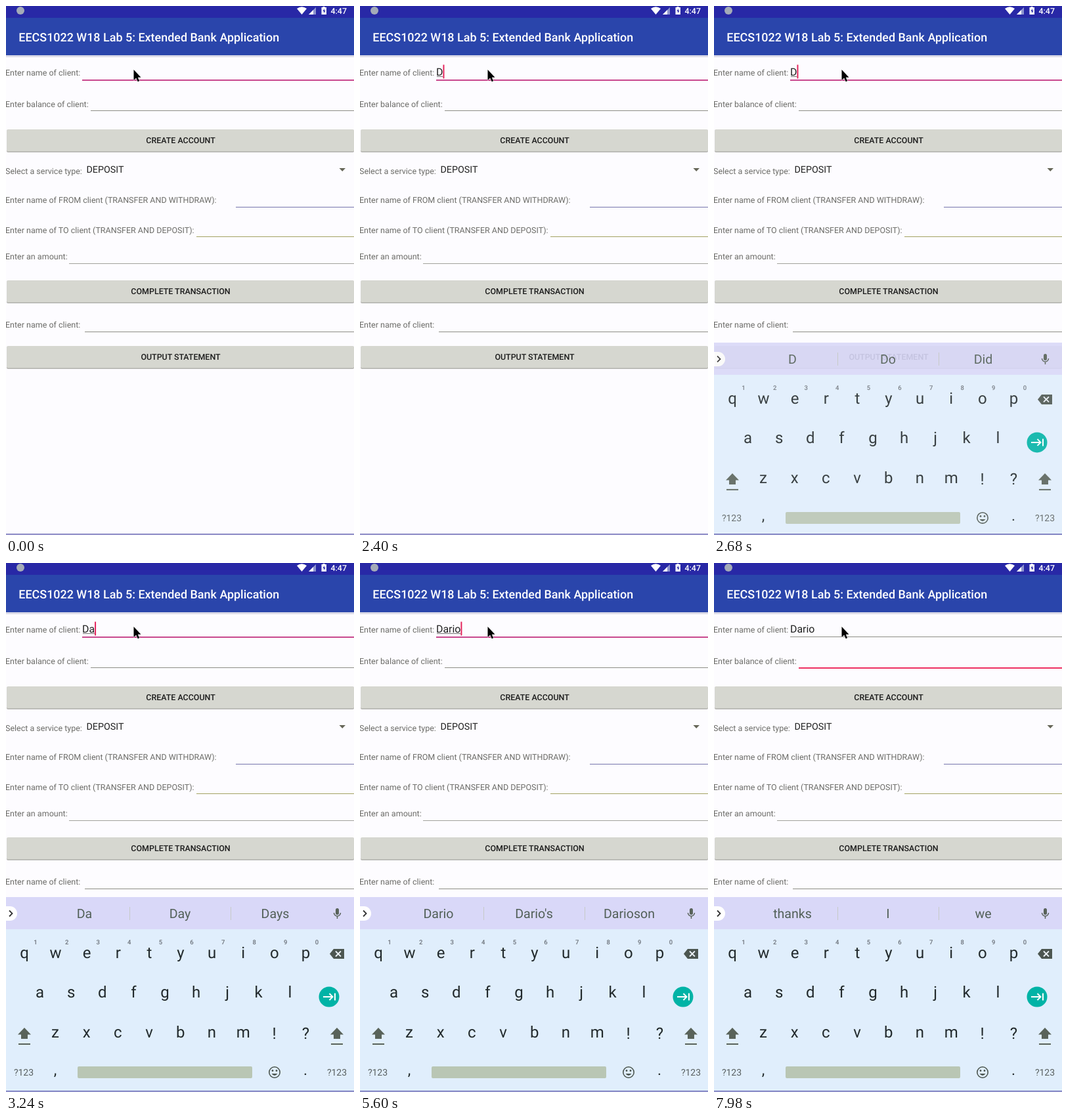
Write an HTML page that moves like this. It is 530 by 806 pixels and loops after 8000 ms.

```html
<!DOCTYPE html>
<html lang="en">
<head>
<meta charset="utf-8">
<title>Bank form</title>
<style>
  html, body { margin: 0; width: 100%; height: 100%; overflow: hidden; background: #fdfcff; }
  svg { display: block; width: 100%; height: 100%; font-family: Roboto, sans-serif; text-rendering: geometricPrecision; }
</style>
</head>
<body>
<svg id="stage" viewBox="0 0 530 806"></svg>
<script>
const LOOP = 8000;
const KEYBOARD_START = 2480, KEYBOARD_TIME = 480, KEYBOARD_DROP = 59;
const FOCUS_TIME = 6040;

// Each entry: start time, typed text, three suggestions
const typing = [
  [2380, "D", ["D", "Do", "Did"]],
  [3080, "Da", ["Da", "Day", "Days"]],
  [3780, "Dar", ["Dar", "Dark", "Dare"]],
  [4480, "Dari", ["Dari", "Daring", "Dario"]],
  [5180, "Dario", ["Dario", "Dario's", "Darioson"]],
  [FOCUS_TIME, "Dario", ["thanks", "I", "we"]]
];

const text = (x, y, size, fill, str, extra = "") =>
  `<text x="${x}" y="${y}" font-size="${size}" fill="${fill}" ${extra}>${str}</text>`;
const rect = (x, y, w, h, fill, extra = "") =>
  `<rect x="${x}" y="${y}" width="${w}" height="${h}" fill="${fill}" ${extra}/>`;
const path = (d, fill, extra = "") => `<path d="${d}" fill="${fill}" ${extra}/>`;
const stroke = (color, width) => `stroke="${color}" stroke-width="${width}"`;
const MIDDLE = 'text-anchor="middle"';
const MEDIUM = 'font-weight="500"';

const label = (y, str) => text(-1, y, 12.5, "#6c6c68", str);
const line = (x, y, color) => rect(x, y, 530 - x, 1, color);
const button = (y, str) =>
  rect(1, y + 1, 529, 34, "#b2b2ae", 'rx="2"') +
  rect(1, y, 529, 33.5, "#d6d7d0", 'rx="2"') +
  text(266, y + 21.3, 12.45, "#1c1c1c", str, `${MIDDLE} ${MEDIUM}`);

function header() {
  return rect(0, 75, 530, 3, "#dcdce8") +
    rect(0, 0, 530, 75, "#2a45ab") +
    rect(0, 0, 530, 18, "#2828a6") +
    '<circle cx="22" cy="7" r="6" fill="#a4abb8"/>' +
    path("M443 4 Q450.500 -1.500 458 4 L450.500 13Z", "#fff") +
    path("M472 2V13H461Z", "#8f95cf") +
    path("M468 6V13H461Z", "#fff") +
    path("M482.500 2V1h3V2H488V13H480.500V2Z", "#fff") +
    path("M485 4 482.500 8H484V11L486.500 7H485Z", "#2828a6") +
    text(494.5, 12, 12.45, "#fff", "4:47", MEDIUM) +
    text(19.3, 53.5, 17.95, "#fff", "EECS1022 W18 Lab 5: Extended Bank Application", MEDIUM);
}

function form() {
  return label(106, "Enter name of client:") +
    label(153.5, "Enter balance of client:") +
    label(256, "Select a service type:") +
    label(300, "Enter name of FROM client (TRANSFER AND WITHDRAW):") +
    label(345.5, "Enter name of TO client (TRANSFER AND DEPOSIT):") +
    label(386, "Enter an amount:") +
    label(490.3, "Enter name of client:") +
    '<rect id="nameLine" x="116" width="414"/><rect id="balanceLine" x="129" width="401"/>' +
    line(350, 306, "#7674ac") + line(290, 351, "#a3a262") +
    line(96, 392, "#a2a29c") + line(120, 496, "#8e8e86") +
    button(188, "CREATE ACCOUNT") +
    button(418, "COMPLETE TRANSACTION") +
    button(518, "OUTPUT STATEMENT") +
    text(122.4, 254.3, 14.3, "#222", "DEPOSIT") +
    path("M507.500 247H517L512.250 252Z", "#666658") +
    text(116, 106, 15.9, "#222", "", 'id="typed"') +
    '<rect id="composing" x="117" y="107" height="1" fill="#777"/>' +
    '<rect id="caret" width="2" height="21" fill="#e4245c"/>';
}

const keyRow = (letters, x, y, pitch = 47.6) =>
  [...letters].map((c, i) => text(x + i * pitch, y, 24, "#222a2c", c, MIDDLE)).join("");

const shiftKey = x =>
  path(`M${x} 708 L${x + 10} 718.500H${x + 5}V725H${x - 5}V718.500H${x - 10}Z`, "#59635a") +
  rect(x - 9, 732, 18, 2, "#59635a");

function keyboard() {
  const digits = [..."1234567890"].map((c, i) =>
    text(45 + i * 47.6, 581, 9.5, "#6a7078", c, `${MIDDLE} ${MEDIUM}`)).join("");
  const suggestions = [119.5, 265, 410].map(x =>
    text(x, 541, 19.6, "#526058", "", `${MIDDLE} class="suggestion"`)).join("");
  return rect(0, 509, 530, 356, "#e0eefc") +
    rect(0, 509, 530, 49, "#d9d8f8") +
    path("M0 523H6A11 11 0 0 1 6 545H0Z", "#fff") +
    path("M5 529.500 9.500 534 5 538.500", "none", stroke("#333", 1.8)) +
    suggestions + rect(188, 524, 1, 20, "#c6cac8") + rect(342, 524, 1, 20, "#c6cac8") +
    rect(502, 526, 5, 10, "#59635a", 'rx="2.5"') +
    path("M499.500 533a5 5 0 0 0 10 0M504.500 538v4", "none", stroke("#59635a", 1.5)) +
    keyRow("qwertyuiop", 28, 602) + digits +
    keyRow("asdfghjkl", 51.5, 662) +
    keyRow("zxcvbnm", 75, 723, 47.7) + keyRow("!?", 408.7, 725) +
    path("M493 595.500 499 588H515V603H499Z", "#4c5650") +
    path("M502 591.500 510 599.500M510 591.500 502 599.500", "none", stroke("#eef4fa", 1.8)) +
    '<circle cx="492" cy="661" r="15.5" fill="#00b3a6"/>' +
    path("M483 661H497M492.500 656 497.500 661 492.500 666M501 655.500V666.500", "none", stroke("#fff", 2)) +
    shiftKey(28) + shiftKey(504) +
    text(27, 781, 14, "#596060", "?123", MIDDLE) +
    text(504, 781, 14, "#596060", "?123", MIDDLE) +
    text(75, 780, 23, "#222a2c", ",", MIDDLE) +
    text(456, 780, 23, "#222a2c", ".", MIDDLE) +
    rect(109, 767, 266, 18, "#b9c6b4", 'rx="2"') +
    `<circle cx="409" cy="776" r="8.2" fill="none" ${stroke("#4c5650", 1.6)}/>` +
    '<g fill="#4c5650"><circle cx="406" cy="773.5" r="1.4"/><circle cx="412" cy="773.5" r="1.4"/></g>' +
    path("M404.500 778Q409 784 413.500 778Z", "#4c5650");
}

const pointer = path("M194.500 97V113L198.200 109.800 200.700 115.300 203.200 114.200 200.800 108.800H205.500Z",
  "#000", stroke("#fff", 1) + ' paint-order="stroke"');

const stage = document.getElementById("stage");
stage.innerHTML = header() + form() + `<g id="keyboard">${keyboard()}</g>` +
  rect(0, 804, 530, 1.5, "#6a68b4") + pointer;

const el = id => document.getElementById(id);
const set = (id, attrs) => {
  for (const name in attrs) el(id).setAttribute(name, attrs[name]);
};
const suggestionNodes = [...document.querySelectorAll(".suggestion")];

const underline = (id, y, focused, color) =>
  set(id, { y, height: focused ? 2 : 1, fill: focused ? color : "#8e8e86" });

function draw(t) {
  const [since, typed, words] = typing.filter(step => t >= step[0]).pop() || [0, "", ["", "", ""]];
  const inBalance = t >= FOCUS_TIME;

  el("typed").textContent = typed;
  const width = typed ? el("typed").getComputedTextLength() : 0;
  set("composing", { width: inBalance ? 0 : Math.max(0, width - 1) });

  const caretOn = typed && (t - since) % 1000 < 500;
  set("caret", {
    x: inBalance ? 129 : 116 + width,
    y: inBalance ? 137 : 89.5,
    visibility: caretOn ? "visible" : "hidden"
  });
  underline("nameLine", 112, !inBalance, "#c8488e");
  underline("balanceLine", 159, inBalance, "#ee3062");
  suggestionNodes.forEach((node, i) => { node.textContent = words[i]; });

  const p = Math.min(1, Math.max(0, (t - KEYBOARD_START) / KEYBOARD_TIME));
  set("keyboard", {
    visibility: t < KEYBOARD_START ? "hidden" : "visible",
    transform: `translate(0 ${KEYBOARD_DROP * (1 - p) ** 5})`,
    opacity: 1 - 0.36 * (1 - p) ** 2.2
  });
}

const start = performance.now();
function tick() {
  draw((performance.now() - start) % LOOP);
  requestAnimationFrame(tick);
}
tick();
</script>
</body>
</html>
```
